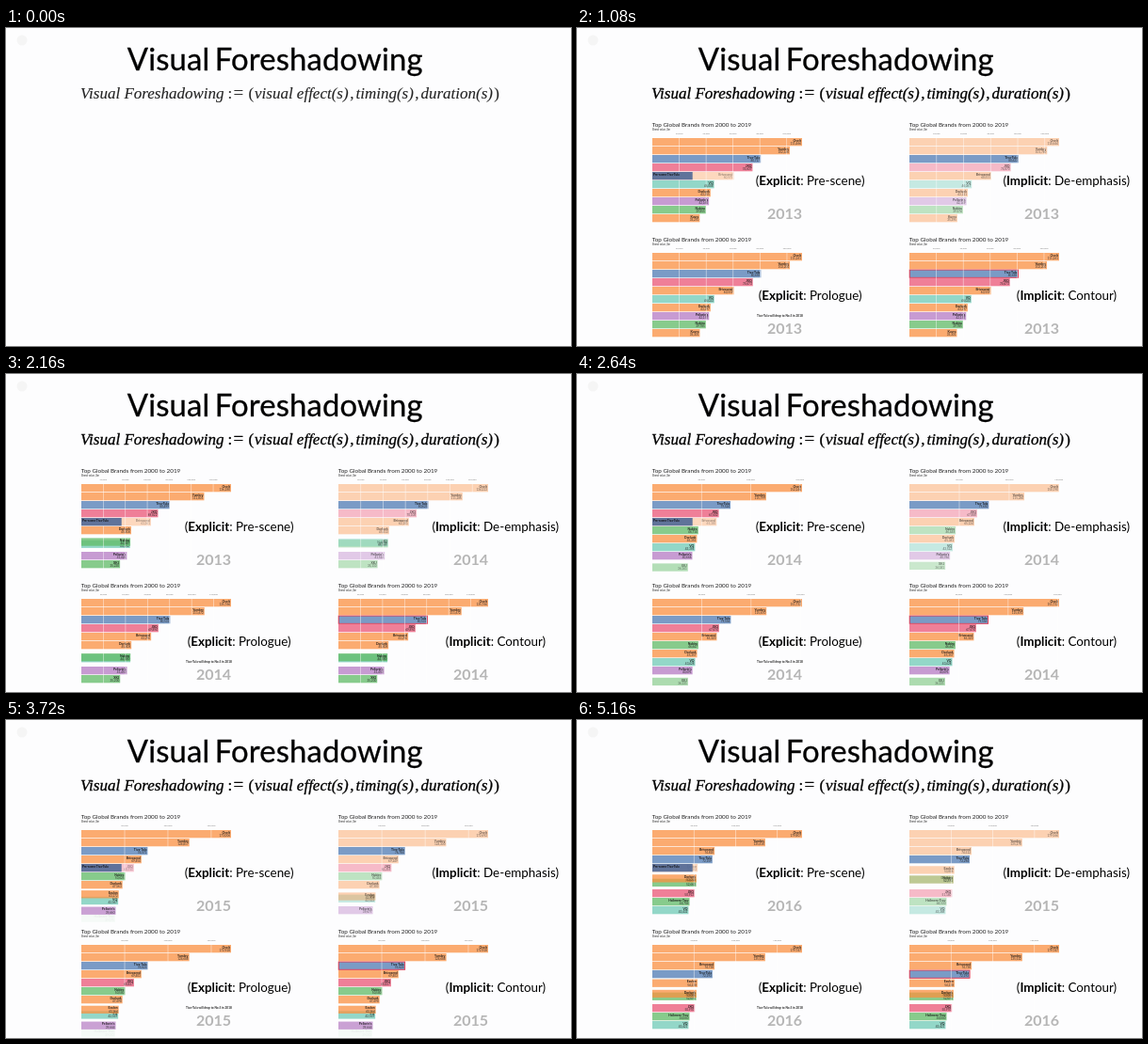
Animation of 600x338 px, one loop 5.28 s. Source, as an HTML page with a canvas:

```html
<!DOCTYPE html>
<html lang="en">
<head>
<meta charset="utf-8">
<title>Visual Foreshadowing</title>
<style>
html, body { margin: 0; width: 100%; height: 100%; overflow: hidden; background: #fdfdfe; }
canvas { display: block; width: 600px; height: 338px; }
</style>
</head>
<body>
<canvas id="stage"></canvas>
<script>
const W = 600, H = 338, LOOP = 5280, STEP = 120;
const SANS = 'Lato, "Open Sans", sans-serif';
const SERIF = '"Liberation Serif", "Noto Serif", serif';
const ORANGE = '#fb9040', BLUE = '#4f7bb3', PINK = '#eb5676';
const TEAL = '#70cbb6', PURPLE = '#b67bc3', GREEN = '#60bb66';

// Name, colour, value in thousands for 2013 to 2017
const BRANDS = [
  ['Ovelt', ORANGE, 98.316, 118.863, 170.276, 178.119, 184.154],
  ['Yumbry', ORANGE, 93.291, 107.439, 120.314, 133.252, 141.703],
  ['Tiva-Tula', BLUE, 79.213, 81.563, 78.423, 73.102, 69.733],
  ['JXQ', PINK, 78.808, 72.244, 65.095, 52.5, 46.829],
  ['Brivosend', ORANGE, 59.546, 61.154, 67.67, 72.795, 79.999],
  ['VQ', TEAL, 46.947, 45.48, 42.267, 43.13, 44.208],
  ["Pellorin's", PURPLE, 41.992, 42.254, 39.809, 39.381, 41.533],
  ['Dorlunk', ORANGE, 39.61, 45.462, 45.297, 51.808, 56.249],
  ['Kuvra', ORANGE, 37.257, 34.153, 35.415, 36.952, 39.459],
  ['Nabiro', GREEN, 35.346, 42.392, 49.048, 53.58, 50.291],
  ['Ezulon', ORANGE, 23.62, 29.478, 39.5, 50.338, 64.796],
  ['Hallmere-Trov', GREEN, 31.904, 34.05, 36.711, 43.49, 47.829],
  ['XKJ', GREEN, 31.839, 34.214, 37.212, 41.535, 41.521]
].map(([name, color, ...values]) => ({ name, color, values }));
const FOCUS = BRANDS[2];

// lag is in years; flips are the times when the year label changes
const CHARTS = [
  { x: 80, y: 0, kind: 'ghost', lag: -0.01, flips: [2240, 3180, 4690], key: 'Explicit', note: 'Pre-scene', mid: 247.6 },
  { x: 353, y: 0, kind: 'dim', lag: 0.03, flips: [1660, 3180, 5280], key: 'Implicit', note: 'De-emphasis', mid: 519.7 },
  { x: 80, y: 122, kind: 'text', lag: 0, flips: [1660, 3300, 4690], key: 'Explicit', note: 'Prologue', mid: 247.6 },
  { x: 353, y: 122, kind: 'outline', lag: 0, flips: [1660, 3180, 4690], key: 'Implicit', note: 'Contour', mid: 520 }
];
const TOP = 117, PITCH = 9, BAR = 8.3, WIDTH = 159, SWAP = 0.2;

const canvas = document.getElementById('stage');
const ctx = canvas.getContext('2d');
const dpr = window.devicePixelRatio || 1;
canvas.width = W * dpr;
canvas.height = H * dpr;

const clamp = v => Math.max(0, Math.min(1, v));

function text(str, x, y, font, color = '#000', align = 'left') {
  ctx.font = font;
  ctx.fillStyle = color;
  ctx.textAlign = align;
  ctx.fillText(str, x, y);
}

function withAlpha(a, draw) {
  ctx.save();
  ctx.globalAlpha *= a;
  draw();
  ctx.restore();
}

function valueAt(brand, year) {
  const u = Math.max(0, year - 2013);
  const i = Math.min(3, Math.floor(u));
  return brand.values[i] + (brand.values[i + 1] - brand.values[i]) * (u - i);
}

// Ranks averaged over a short window, so bars glide past each other
function ranksAt(year) {
  const n = 16, ranks = BRANDS.map(() => 0);
  for (let k = 0; k < n; k++) {
    const at = year + SWAP * ((k + 0.5) / n - 0.5);
    const vals = BRANDS.map(b => valueAt(b, at));
    vals.forEach((v, i) => { ranks[i] += vals.filter(o => o > v).length / n; });
  }
  return ranks;
}

const thousands = v => Math.round(v * 1000).toLocaleString('en-US');

function drawBar(chart, brand, rank, value, scale, fade) {
  const y = TOP + rank * PITCH, w = value * scale;
  const focus = brand === FOCUS;
  const faded = chart.kind === 'dim' && !focus;
  let a = clamp(10 - rank);
  if (chart.kind === 'ghost' && !focus) a *= 1 - 0.55 * clamp(1 - Math.abs(rank - 4));
  // Bar colours come in later than the text
  withAlpha(a * fade * (faded ? 0.4 : 0.75), () => {
    ctx.fillStyle = brand.color;
    ctx.fillRect(0, y, w, BAR);
  });
  withAlpha(a * (faded ? 0.65 : 0.9), () => {
    text(brand.name, w - 1, y + 3.7, `bold 3.4px ${SANS}`, '#111', 'right');
    text(thousands(value), w - 1, y + 7.1, `3.1px ${SANS}`, '#222', 'right');
  });
  if (focus && chart.kind === 'outline') {
    ctx.strokeStyle = '#e2304a';
    ctx.lineWidth = 0.9;
    ctx.strokeRect(0.2, y, w, BAR);
  }
}

function drawChart(chart, t, fade) {
  const year = 2013.63 + 0.000647 * (t - 1080) - chart.lag;
  const values = BRANDS.map(b => valueAt(b, year));
  const ranks = ranksAt(year);
  const max = Math.max(...values), scale = WIDTH / max;

  ctx.save();
  ctx.translate(chart.x, chart.y);
  text('Top Global Brands from 2000 to 2019', -0.3, 104.9, `6.35px ${SANS}`, '#222');
  text('Brand value, $m', 0, 109.4, `2.7px ${SANS}`, '#333');

  BRANDS.map((b, i) => i)
    .filter(i => ranks[i] < 10)
    .sort((a, b) => ranks[b] - ranks[a])
    .forEach(i => drawBar(chart, BRANDS[i], ranks[i], values[i], scale, fade));

  const gap = max > 150 ? 50 : 20;
  for (let v = gap; v < max; v += gap) {
    const x = v * scale;
    text(thousands(v), x, 113, `2.4px ${SANS}`, '#777', 'center');
    ctx.fillStyle = 'rgba(255,255,255,0.6)';
    ctx.fillRect(x - 0.3, 115, 0.7, 92);
  }

  if (chart.kind === 'ghost') {
    const y = TOP + 4 * PITCH;
    ctx.fillStyle = 'rgba(83,107,151,0.92)';
    ctx.fillRect(0, y, 42.7, BAR);
    text('Pre-scene ' + FOCUS.name, 1, y + 3.8, `bold 3.2px ${SANS}`, '#111');
  }
  if (chart.kind === 'text') {
    text(FOCUS.name + ' will drop to No.5 in 2018', 111, 185, `bold 3.2px ${SANS}`, '#222');
  }

  const shown = 2013 + chart.flips.filter(f => t >= f).length;
  text(shown, WIDTH, 202.5, `bold 16px ${SANS}`, '#b6b6b6', 'right');
  ctx.restore();
}

function drawNote({ key, note, mid, y }) {
  const plain = `13.4px ${SANS}`, bold = `bold 13.4px ${SANS}`;
  const parts = [['(', plain], [key, bold], [': ' + note + ')', plain]];
  const widths = parts.map(([s, f]) => { ctx.font = f; return ctx.measureText(s).width; });
  let x = mid - widths.reduce((a, b) => a + b) / 2;
  parts.forEach(([s, f], i) => {
    text(s, x, 166.6 + y, f);
    x += widths[i];
  });
}

function drawHeading(fade) {
  ctx.fillStyle = '#f5f5f5';
  ctx.beginPath();
  ctx.arc(17, 13, 5.5, 0, 7);
  ctx.fill();

  ctx.save();
  ctx.letterSpacing = '0.15px';
  ctx.wordSpacing = '-3px';
  text('Visual Foreshadowing', 128.8, 45, `32.8px ${SANS}`);
  ctx.strokeStyle = '#000';
  ctx.lineWidth = 0.3;
  ctx.strokeText('Visual Foreshadowing', 128.8, 45);
  ctx.restore();

  const italic = `italic 17px ${SERIF}`, upright = `17px ${SERIF}`;
  const formula = [
    ['Visual Foreshadowing', 79, italic], [':', 235.5, upright], ['=', 241.5, `19px ${SERIF}`],
    ['(', 257.5, upright], ['visual effect(s)', 264, italic], [',', 365.3, upright],
    ['timing(s)', 371.5, italic], [',', 434.3, upright],
    ['duration(s)', 440.5, italic], [')', 518.3, upright]
  ];
  const ink = clamp(fade * 2);
  withAlpha(0.86 + 0.14 * ink, () => {
    ctx.lineWidth = 0.1 + 0.2 * ink;
    ctx.strokeStyle = '#000';
    for (const [s, x, font] of formula) {
      text(s, x, 75.3, font);
      ctx.strokeText(s, x, 75.3);
    }
  });
}

function draw(t) {
  const fade = t < 360 ? 0 : clamp((t - 300) / 600);
  ctx.setTransform(dpr, 0, 0, dpr, 0, 0);
  ctx.fillStyle = '#fdfdfe';
  ctx.fillRect(0, 0, W, H);
  drawHeading(fade);
  if (!fade) return;
  withAlpha(fade, () => CHARTS.forEach(c => {
    drawChart(c, t, Math.sqrt(fade));
    drawNote(c);
  }));
}

const start = performance.now();
let last = -1;
function tick() {
  const t = Math.floor(((performance.now() - start) % LOOP) / STEP) * STEP;
  if (t !== last) draw(last = t);
  requestAnimationFrame(tick);
}
tick();
</script>
</body>
</html>
```
